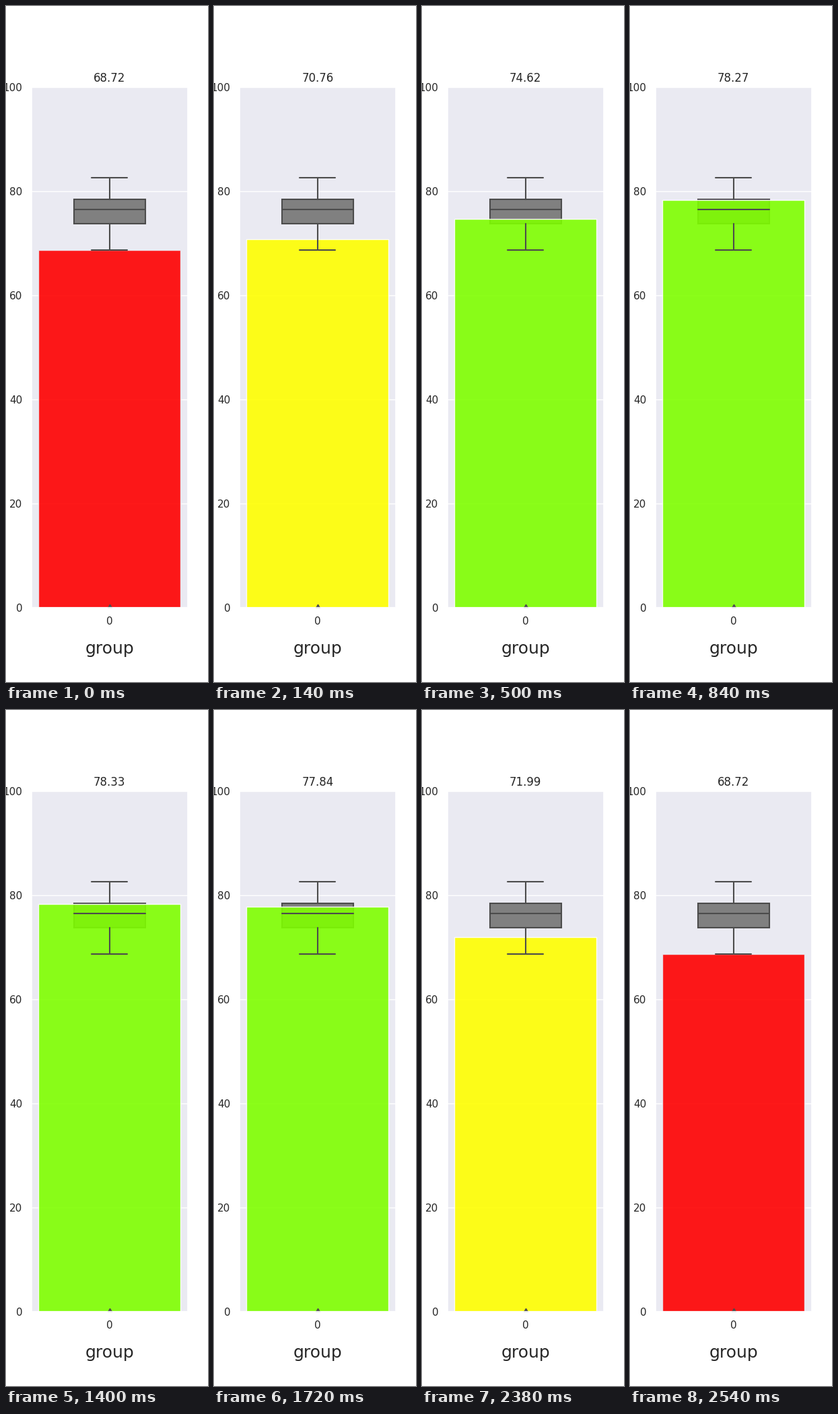
Recreate the animation shown at these times as a matplotlib script. Size 300x1000 px, loop 2560 ms.

```python
import matplotlib.pyplot as plt
import numpy as np
from matplotlib.animation import FuncAnimation
from matplotlib.patches import Rectangle

FRAMES = 128
BACK, INK, BOX_LINE = "#EAEAF2", ".15", "#4c4c4c"
LOW, Q1, MEDIAN, Q3, HIGH = 68.72, 73.77, 76.5, 78.45, 82.6
RED_BELOW = 70

# Readings are held between these frames, then the sequence runs backwards.
STEPS = np.array([0, 1, 3, 5, 8, 9, 12, 15, 16, 18, 20, 22, 23, 25, 26,
                  31, 33, 34, 36, 37, 39, 40, 42,
                  47, 49, 50, 52, 54, 56, 57, 58, 61])
KEY_FRAMES = [0, 8, 15, 25, 42, 50, 57, 61]
KEY_VALUES = [LOW, 71.99, 74.05, 74.62, 78.27, 78.8, 78.33, HIGH]

plt.rcParams.update({
    "font.family": "DejaVu Sans",
    "text.color": INK,
    "axes.labelcolor": INK,
    "axes.facecolor": BACK,
    "axes.edgecolor": "white",
    "axes.linewidth": 1.25,
    "axes.axisbelow": True,
    "grid.color": "white",
    "grid.linewidth": 1,
    "lines.solid_capstyle": "round",
})


def reading(frame):
    frame = min(frame, FRAMES - 1 - frame)
    start = STEPS[STEPS <= frame].max()
    return np.interp(start, KEY_FRAMES, KEY_VALUES)


def bar_color(value):
    if value < RED_BELOW:
        return "red"
    return "yellow" if value < Q1 else "chartreuse"


def draw_box(ax, width=0.4):
    half, cap = width / 2, width / 4
    ax.add_patch(Rectangle((-half, Q1), width, Q3 - Q1, facecolor="gray",
                           edgecolor=BOX_LINE, linewidth=1.5, zorder=1))
    segments = [
        ((0, 0), (LOW, Q1)),
        ((0, 0), (Q3, HIGH)),
        ((-cap, cap), (LOW, LOW)),
        ((-cap, cap), (HIGH, HIGH)),
        ((-half, half), (MEDIAN, MEDIAN)),
    ]
    for x, y in segments:
        ax.plot(x, y, color=BOX_LINE, linewidth=1.5)
    ax.plot([0], [0], "d", color=BOX_LINE, markersize=5)


fig, ax = plt.subplots(figsize=(3, 10), dpi=100)
draw_box(ax)
bar = ax.bar(0, LOW, width=0.8, linewidth=1, alpha=0.9, zorder=1)[0]

ax.set_xlim(-0.44, 0.44)
ax.set_ylim(0, 100)
ax.set_xticks([0])
ax.set_yticks(range(0, 101, 20))
ax.grid(axis="y")
ax.tick_params(length=0, pad=9.5, labelsize=11, labelcolor=INK)
ax.set_xlabel("group", fontsize=18, labelpad=15)
title = ax.set_title("", fontsize=12, pad=6)


def update(frame):
    value = reading(frame)
    color = bar_color(value)
    bar.set_height(value)
    bar.set_facecolor(color)
    bar.set_edgecolor(BACK if color == "red" else "white")
    title.set_text(f"{value:.2f}")
    return bar, title


animation = FuncAnimation(fig, update, frames=FRAMES, interval=20, repeat=True)
plt.show()
```
